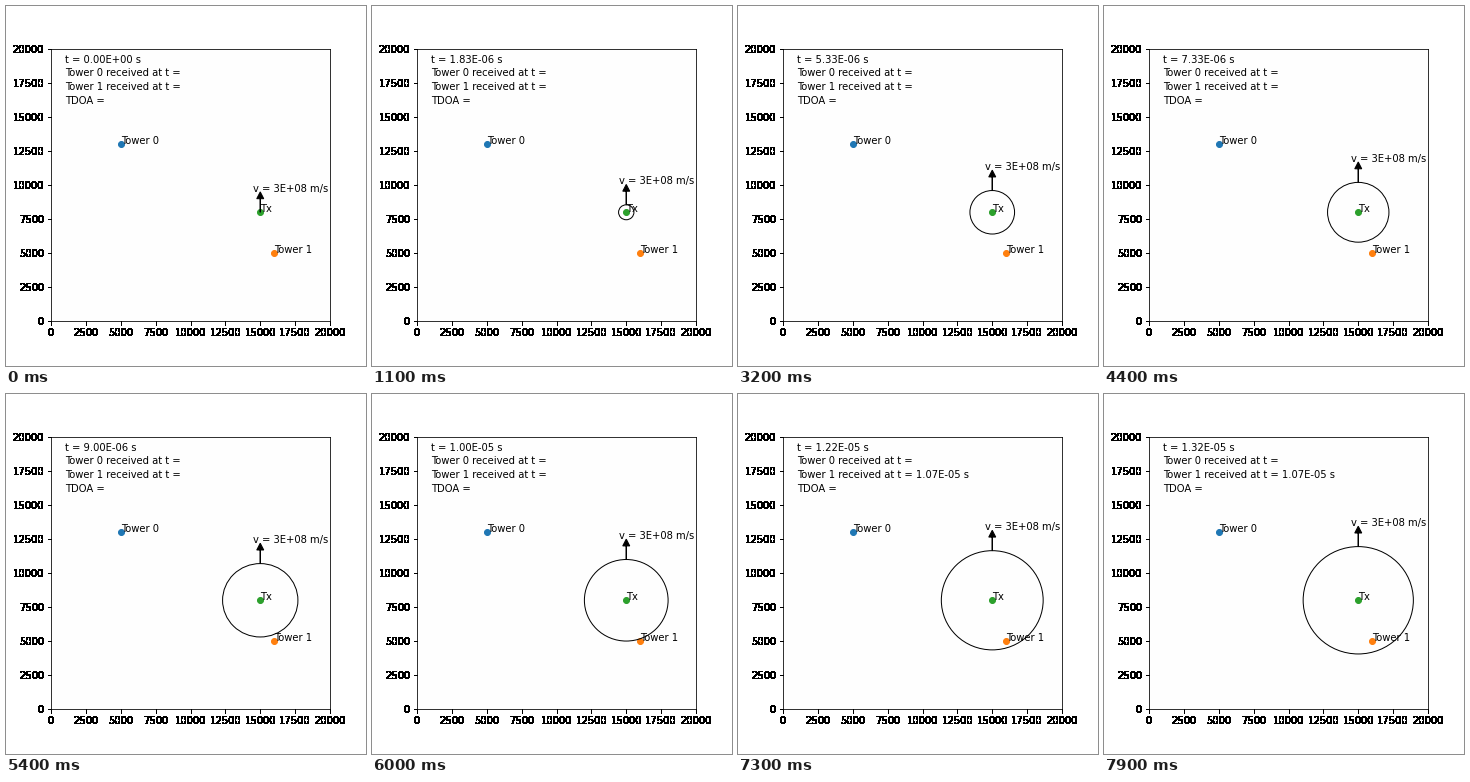
A matplotlib script that plays this animation: 360 by 360 pixels, repeating every 8 s.

```python
import numpy as np
import matplotlib.pyplot as plt
from matplotlib.animation import FuncAnimation
from matplotlib.patches import Circle

plt.rcParams.update({"font.family": "DejaVu Sans", "font.size": 10})

FRAMES, INTERVAL = 80, 100
STEP = 1e-6 / 6          # simulated seconds per frame
SPEED = 3e8              # m/s
SIZE = 20000
TX = (15000, 8000)
TOWERS = [(5000, 13000), (16000, 5000)]


def harden(image, dpi):
    """Make every touched pixel fully opaque, giving hard bold edges."""
    image = image.copy()
    image[..., 3] = image[..., 3] > 0
    return image, 0, 0


fig = plt.figure(figsize=(5, 5), dpi=72, facecolor="white")
ax = fig.add_axes([0.125, 0.125, 0.775, 0.755], facecolor="#fefefe")
ax.set(xlim=(0, SIZE), ylim=(0, SIZE))
ticks = np.arange(0, SIZE + 1, 2500)
ax.set_xticks(ticks)
ax.set_yticks(ticks)
for axis in (ax.xaxis, ax.yaxis):
    for part in axis.get_ticklabels() + axis.get_ticklines():
        part.set_agg_filter(harden)

for i, (x, y) in enumerate(TOWERS):
    ax.scatter(x, y, color=f"C{i}")
    ax.text(x, y, f"Tower {i}")
ax.scatter(*TX, color="C2")
ax.text(*TX, "Tx")

wave = ax.add_patch(Circle(TX, 0, fill=False, lw=1))
arrow = ax.arrow(*TX, 0, 1000, head_width=500, head_length=500, fc="k", ec="k")
speed_label = ax.text(14500, 0, f"v = {SPEED:.0E} m/s")
lines = [ax.text(1000, 19000 - 1000 * i, "") for i in range(4)]

# Reception is noticed on the first step after the wave reaches a tower.
arrivals = [np.ceil(np.hypot(x - TX[0], y - TX[1]) / SPEED / STEP) * STEP
            for x, y in TOWERS]


def update(frame):
    t = frame * STEP
    radius = SPEED * t
    front = TX[1] + radius
    wave.set_radius(radius)
    wave.set_visible(frame > 0)
    arrow.set_data(y=front)
    speed_label.set_y(front + 1500)

    lines[0].set_text(f"t = {t:.2E} s")
    for i, arrival in enumerate(arrivals):
        heard = f"{arrival:.2E} s" if t > arrival - STEP / 2 else ""
        lines[i + 1].set_text(f"Tower {i} received at t = {heard}")
    lines[3].set_text("TDOA = ")
    return [wave, arrow, speed_label, *lines]


anim = FuncAnimation(fig, update, frames=FRAMES, interval=INTERVAL,
                     repeat=True, repeat_delay=0)
plt.show()
```
